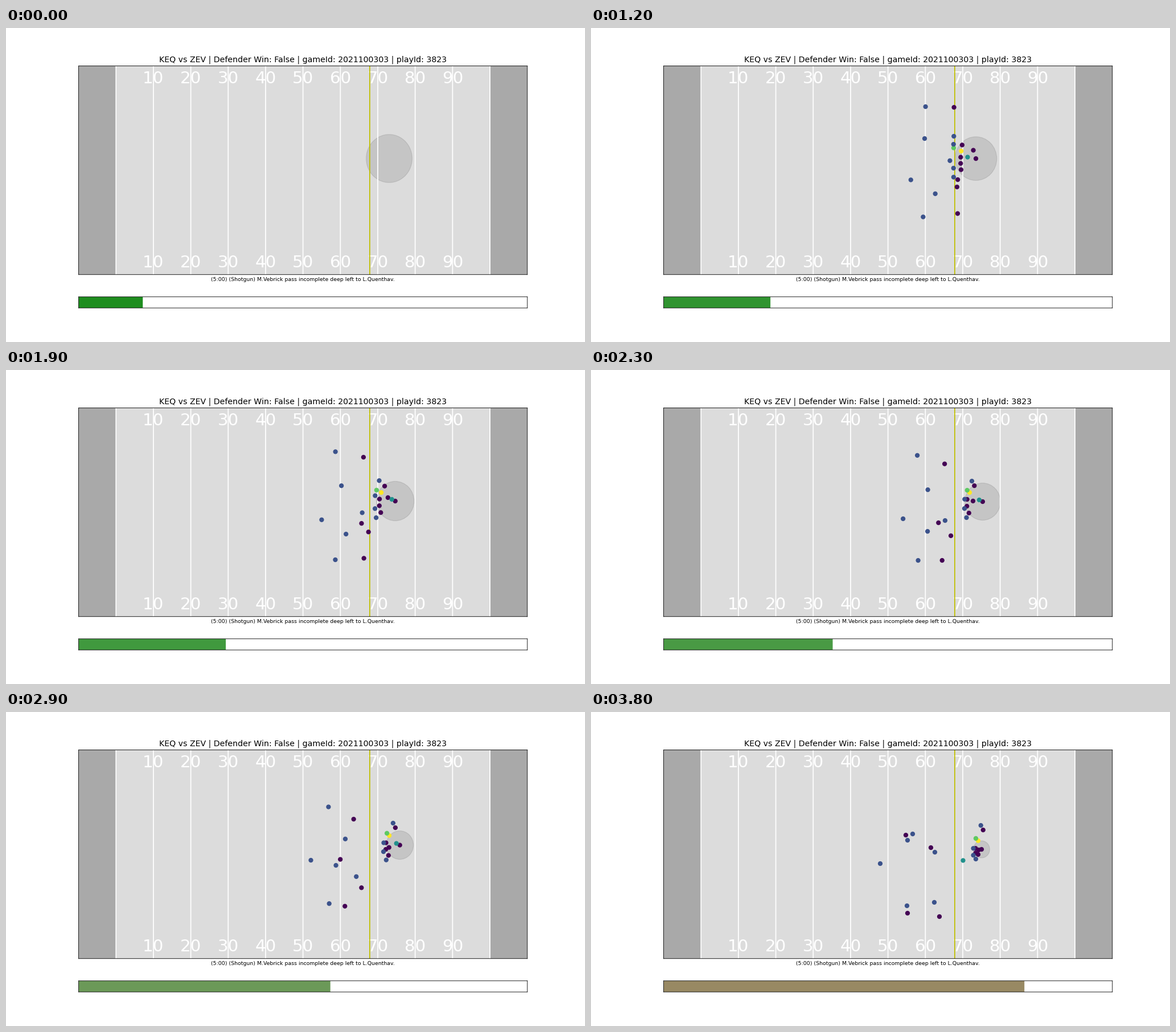
These frames come from a looping animation (1017x551 px, 3.9 s). A matplotlib script:

```python
import numpy as np
import matplotlib.pyplot as plt
from matplotlib.animation import FuncAnimation
from matplotlib.patches import Circle, Rectangle

FRAMES, INTERVAL = 39, 100
STAGE_H = 551
TITLE = "KEQ vs ZEV | Defender Win: False | gameId: 2021100303 | playId: 3823"
PLAY = "(5:00) (Shotgun) M.Vebrick pass incomplete deep left to L.Quenthav."
PURPLE, BLUE, TEAL, GREEN, YELLOW = (
    "#440154", "#3b528b", "#21918c", "#5ec962", "#fde725")

# Seconds: snap of the ball, first real steps, throw, end of the play.
SNAP, GO, THROW, STOP = 0.5, 0.7, 3.5, 3.8
VIA = 0.35  # progress at which a route passes its bend

# Routes in stage pixels: start, end and, for curved ones, the bend.
receivers = [
    [(641, 135), (597, 238), (621, 165)],
    [(651, 264), (553, 216), (610, 268)],
    [(645, 278), (612, 359), (632, 291)],
    [(649, 324), (556, 353)],
]
back = [(672, 211), (681, 242), (671, 230)]
passer = [(673, 229), (686, 241), (688, 231)]
coverage = [
    [(591, 137), (565, 214), (573, 150)],
    [(585, 191), (604, 246)],
    [(632, 227), (603, 334)],
    [(564, 268), (508, 266), (548, 261)],
    [(607, 291), (556, 225), (591, 283)],
    [(585, 331), (555, 340)],
]


def ramp(t, start, stop):
    return np.clip((t - start) / (stop - start), 0, 1)


def run(progress, start, end, via=None):
    """Straight run from start to end, bowed so that it passes via."""
    start, end = np.asarray(start, float), np.asarray(end, float)
    spot = start + (end - start) * progress
    if via is not None:
        bow = np.asarray(via) - (start + (end - start) * VIA)
        spot = spot + bow * progress * (1 - progress) / (VIA * (1 - VIA))
    return spot


def blockers(progress):
    """An even line of five that folds back into a cup around the passer."""
    i = np.arange(5)
    line = np.column_stack([np.full(5, 647), 206 + 10.5 * i])
    cup = np.column_stack([660 + 2 * (i - 2.6) ** 2, 203 + 12 * i])
    pile = np.column_stack([675 + 2.2 * (i - 2.5) ** 2,
                            250 - 43 * (1 - i / 4) ** 2])
    return run(progress, line, pile, cup)


def rushers(t, opponents):
    """Each rusher closes on his blocker and then stays pressed against him."""
    i = np.arange(5)
    line = np.column_stack([np.full(5, 634.5), [188, 210, 198, 247, 263]])
    contact = opponents + np.column_stack([np.full(5, -4), 4 * i - 8])
    u = ramp(t, GO, 2.4)
    return line + (contact - line) * u * u * (3 - 2 * u)


def ball(t, thrower):
    hand = thrower + (-6, -3)
    snapped = run(ramp(t, SNAP, SNAP + 1), (641.5, 227.5), hand)
    return run(ramp(t, THROW, STOP), snapped, (653.5, 260.5))


def pressure_at(t):
    return np.interp(t, [0, 0.7, 1.2, 1.9, 2.4, 2.9, 3.8],
                     [.143, .128, .238, .328, .389, .561, .804])


def pressure_color(p):
    return np.array([28 + 184 * (p - .13),
                     155 - 146 * (p - .45) ** 2,
                     99 - 137 * (p - .85) ** 2]) / 255


plt.rcParams.update({"path.snap": False, "axes.linewidth": .72})
fig = plt.figure(figsize=(12, 6.502), dpi=84.75)


def add_panel(top, bottom):
    """Full-width axes between two heights on a 1200 by 650 layout."""
    return fig.add_axes((150.5 / 1200, 1 - bottom / 650,
                         930 / 1200, (bottom - top) / 650),
                        xticks=[], yticks=[])


field = add_panel(78.5, 510.5)
meter = add_panel(556.5, 579.5)

field.set(xlim=(0, 120), ylim=(0, 53.3), facecolor="darkgrey")
field.add_patch(Rectangle((10, 0), 100, 53.3, color="gainsboro", lw=0, zorder=0))
field.set_title(TITLE, fontsize=12)
field.set_xlabel(PLAY, fontsize=8)
for x in range(10, 111, 10):
    field.axvline(x, color="white", lw=1.5)
for x in range(20, 101, 10):
    for y in (1.9, 48.9):
        field.text(x, y, str(x - 10), fontsize=25, color="white",
                   ha="center", va="baseline", zorder=2)
field.axvline(77.85, color="y", lw=1.5, zorder=2.5)

meter.set(xlim=(0, 1), ylim=(0, 1))
bar = meter.add_patch(Rectangle((0, 0), 0, 1, lw=0))
pocket = field.add_patch(Circle((0, 0), 1, color="black", alpha=.1))

colors = ([PURPLE] * 7 + [YELLOW] + [PURPLE] * 3 + [TEAL]
          + [BLUE] * 7 + [GREEN] + [BLUE] * 3)
dots = field.scatter([0] * len(colors), [0] * len(colors), c=colors, zorder=3)


def to_field(points):
    return field.transData.inverted().transform(
        np.asarray(points) * (1, -1) + (0, STAGE_H))


def update(frame):
    t = frame * INTERVAL / 1000
    progress = ramp(t, GO, STOP) ** 1.6
    pressure = pressure_at(t)
    thrower = run(progress, *passer)
    line = blockers(progress)

    bar.set_width(pressure)
    bar.set_facecolor(pressure_color(pressure))
    pocket.center = to_field([thrower])[0]
    pocket.set_radius(7 - 6 * pressure)

    spots = np.vstack([
        [run(progress, *route) for route in receivers + [back]],
        thrower, line, ball(t, thrower),
        [run(progress, *route) for route in coverage],
        rushers(t, line)])
    dots.set_offsets(to_field(spots))
    dots.set_visible(frame > 0)
    return bar, pocket, dots


anim = FuncAnimation(fig, update, frames=FRAMES, interval=INTERVAL,
                     repeat=True, repeat_delay=0)
plt.show()
```
